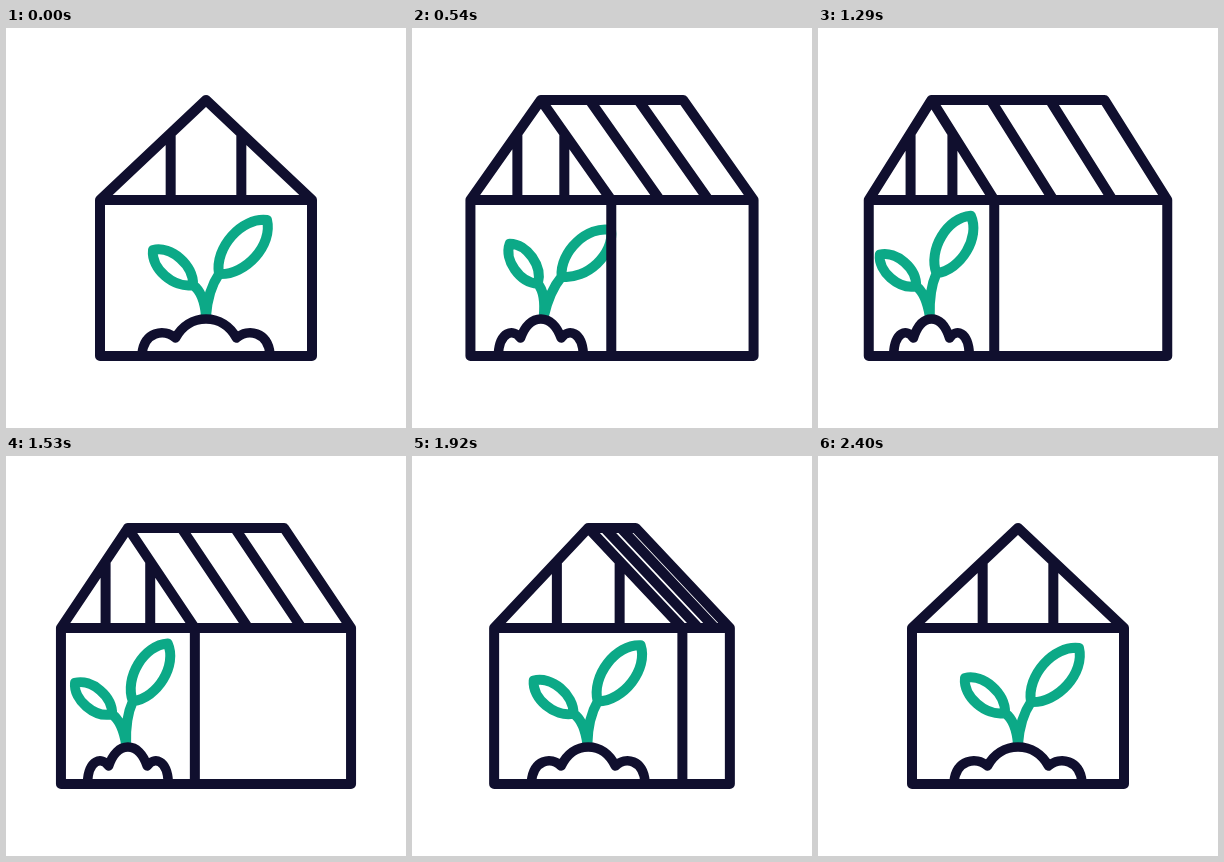
Animation of 400x400 px, one loop 4.43 s. Source, as an HTML page:

```html
<!DOCTYPE html>
<html lang="en">
<head>
<meta charset="utf-8">
<title>Greenhouse</title>
<style>
  html, body { margin: 0; width: 100%; height: 100%; overflow: hidden; background: #fff; }
  svg { display: block; width: 100vw; height: 100vh; }
  path { fill: none; stroke-width: 10; stroke-linecap: round; stroke-linejoin: round; }
  #plant { stroke: #0ca987; }
  #house, #soil { stroke: #100f2e; }
  #soil { stroke-width: 9.5; }
</style>
</head>
<body>
<svg viewBox="0 0 400 400">
  <path id="plant"/>
  <path id="soil"/>
  <path id="house"/>
</svg>
<script>
const LOOP = 4430, STEP = 30, HALF = 1200, END = 2400;
const MID = 200, TOP = 72, EAVE = 172, FLOOR = 328;
const WIDTH = 106, TURN = 87, PIVOT = 306;

const show = (id, d) => document.getElementById(id).setAttribute('d', d);
const pt = (x, y) => x.toFixed(2) + ' ' + y.toFixed(2) + ' ';
const line = (...pts) => 'M' + pts.map(p => pt(...p)).join('L');
const smooth = u => u * u * (3 - 2 * u);

// cubic-bezier(x1, 0, x2, 1)
function ease(p, x1, x2) {
  let lo = 0, hi = 1, u = 0.5;
  for (let i = 0; i < 24; i++) {
    u = (lo + hi) / 2;
    const v = 1 - u;
    const x = 3 * v * v * u * x1 + 3 * v * u * u * x2 + u * u * u;
    if (x < p) lo = u; else hi = u;
  }
  return smooth(u);
}

// how far the ridge ends move apart from the middle
function turnAt(t) {
  if (t <= 0 || t >= END) return 0;
  return t < HALF
    ? TURN * ease(t / HALF, 0.16, 0.09)
    : TURN * (1 - ease(t / HALF - 1, 0.6, 0.4));
}

// the plant leans right, swings left, then settles (degrees)
function swayAt(t) {
  const lean = (from, to, t0, t1) => from + (to - from) * smooth((t - t0) / (t1 - t0));
  if (t < 360) return lean(0, 10.7, 0, 360);
  if (t < 1400) return lean(10.7, -6, 360, 1400);
  return lean(-6, 0, 1400, END);
}

function leaf([bx, by], [tx, ty]) {
  const dx = tx - bx, dy = ty - by;
  const at = (along, side) => pt(bx + along * dx - side * dy, by + along * dy + side * dx);
  const edge = (a, b, s) => 'C' + at(a, s) + at(b, s);
  return 'M' + at(0, 0) + edge(0.23, 0.8, 0.29) + at(1, 0) + edge(0.8, 0.23, -0.29) + at(0, 0) + 'Z';
}

function drawPlant(mid, c, t) {
  const a = swayAt(t) * Math.PI / 180, sin = Math.sin(a), cos = Math.cos(a);
  const squeeze = 1 - c / 500;
  const place = (x, y) => {
    const px = x * squeeze, py = y - PIVOT;
    return [mid + px * cos - py * sin, PIVOT + px * sin + py * cos];
  };
  const root = place(0, 288);
  const branch = (base, bend, tip) =>
    'M' + pt(...base) + 'Q' + pt(...bend) + pt(...root) + leaf(base, tip);
  show('plant',
    branch(place(-13, 257), place(-2, 265), place(-53, 222)) +
    branch(place(13, 246), place(2, 262), place(61, 192)));
}

function drawSoil(mid, k) {
  const p = (x, y) => pt(mid + x * k, y);
  show('soil',
    'M' + p(-64, 326) + 'C' + p(-62, 304) + p(-42, 300) + p(-30.5, 310) +
    'C' + p(-24, 298) + p(-13, 291) + p(0, 291) +
    'C' + p(13, 291) + p(24, 298) + p(30.5, 310) +
    'C' + p(42, 300) + p(62, 304) + p(64, 326));
}

function drawHouse(front, back, half) {
  const left = front - half, wall = front + half, right = back + half;
  let d = line([left, EAVE], [front, TOP], [back, TOP], [right, EAVE], [right, FLOOR], [left, FLOOR]) + 'Z' +
    line([left, EAVE], [right, EAVE]) + line([wall, EAVE], [wall, FLOOR]);
  for (const side of [-1, 1]) {
    const x = front + side * half / 3;
    d += line([x, TOP + (EAVE - TOP) / 3], [x, EAVE]);
  }
  for (let i = 0; i < 3; i++) {
    const x = front + (back - front) * i * 0.342;
    d += line([x, TOP], [x + half, EAVE]);
  }
  show('house', d);
}

function draw(t) {
  const c = turnAt(t), half = WIDTH - c / 2;
  drawPlant(MID - c, c, t);
  drawSoil(MID - c, half / WIDTH);
  drawHouse(MID - c, MID + c, half);
}

const start = performance.now();
function tick() {
  const t = (performance.now() - start) % LOOP;
  draw(Math.min(Math.floor(t / STEP) * STEP, END));
  requestAnimationFrame(tick);
}
tick();
</script>
</body>
</html>
```
